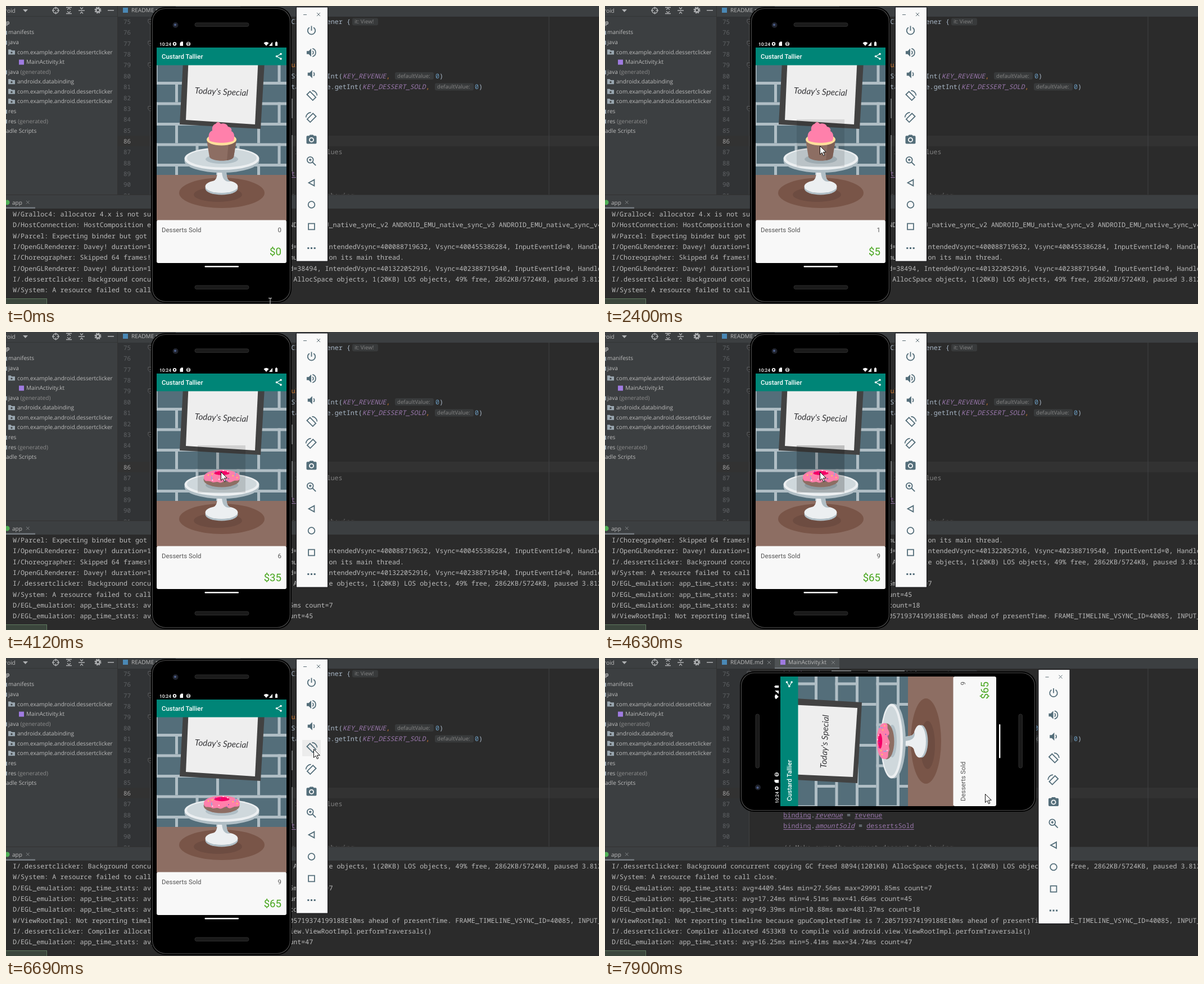
Recreate the animation shown at these times as an HTML page with a canvas. Size 1055 px wide and 531 px high, loop 8000 ms.

```html
<!DOCTYPE html>
<html lang="en">
<head>
<meta charset="utf-8">
<title>Emulator demo</title>
<style>
html, body { margin: 0; width: 100%; height: 100%; overflow: hidden; background: #2b2b2b; }
canvas { display: block; width: 1055px; height: 531px; }
</style>
</head>
<body>
<canvas id="stage" width="1055" height="531"></canvas>
<script>
const ctx = document.getElementById('stage').getContext('2d');
const LOOP = 8000, ROTATE_START = 6840, ROTATE_END = 6990;
const CHAR = 7.04;
const MONO = '"Noto Sans Mono", "DejaVu Sans Mono", monospace';
const CODE = CHAR / .6 + 'px ' + MONO;
const UI = '"Open Sans", "Noto Sans", sans-serif';
const APP = 'Roboto, sans-serif';
const PLAIN = '#a9b7c6', PURPLE = '#9876aa', ORANGE = '#cc7832', BLUE = '#6897bb', GREY = '#808080';
const ICON = '#546e7a';

// ---- timeline: each entry holds until the next one ----
const cursorKeys = [
  [0, 470, 527, 'beam'], [930, 452, 470], [1050, 431, 396], [1170, 410, 322], [1290, 395, 269],
  [1440, 382, 249], [4890, 404, 241], [5010, 460, 222], [5130, 528, 203], [5250, 579, 188, 'beam'],
  [5400, 578, 187, 'beam'], [5550, 565, 179], [5670, 557, 172], [5790, 551, 167], [5940, 549, 164],
  [6070, 547, 162], [7240, 572, 176], [7360, 607, 196], [7480, 640, 214], [7630, 662, 232],
  [7780, 671, 238], [7900, 676, 242]
];
const saleKeys = [
  [0, 0, 0], [2400, 1, 5], [2550, 2, 10], [2700, 3, 15], [2820, 4, 20],
  [4120, 6, 35], [4390, 7, 45], [4510, 8, 55], [4630, 9, 65]
];
const rippleKeys = [
  [0, 0], [2400, .1], [2550, .2], [2970, .2], [3120, .1], [3270, 0],
  [4120, .12], [4390, .2], [4890, .14], [5010, .07], [5130, 0]
];
const logKeys = [[0, 0], [2550, 1], [3510, 2], [4390, 3], [4630, 4], [5400, 6]];
const at = (keys, t) => keys.filter(k => k[0] <= t).pop();

const frameStats = (avg, min, max, count) =>
  `D/EGL_emulation: app_time_stats: avg=${avg}ms min=${min}ms max=${max}ms count=${count}`;
const slowFrame = (id, intended, vsync) =>
  `I/OpenGLRenderer: Davey! duration=1067ms; Flags=1, FrameTimelineVsyncId=${id}, ` +
  `IntendedVsync=${intended}, Vsync=${vsync}, InputEventId=0, HandleInputStart=0`;
const log = [
  'W/Gralloc4: allocator 4.x is not supported',
  'D/HostConnection: HostComposition ext ANDROID_EMU_CHECKSUM_HELPER_v1 ' +
    [2, 3, 4].map(v => 'ANDROID_EMU_native_sync_v' + v).join(' '),
  'W/Parcel: Expecting binder but got null!',
  slowFrame(38488, '400088719632', '400455386284'),
  'I/Choreographer: Skipped 64 frames!  The application may be doing too much work on its main thread.',
  slowFrame(38494, '401322052916', '402388719540'),
  'I/.dessertclicker: Background concurrent copying GC freed 8094(1201KB) AllocSpace objects, ' +
    '1(20KB) LOS objects, 49% free, 2862KB/5724KB, paused 3.812ms',
  'W/System: A resource failed to call close.',
  frameStats('4409.54', '27.56', '29991.85', 7),
  frameStats('17.24', '4.51', '41.66', 45),
  frameStats('49.39', '10.88', '481.37', 18),
  'W/ViewRootImpl: Not reporting timeline because gpuCompletedTime is 7.205719374199188E10ms ' +
    'ahead of presentTime. FRAME_TIMELINE_VSYNC_ID=40085, INPUT_ID=0',
  'I/.dessertclicker: Compiler allocated 4533KB to compile void android.view.ViewRootImpl.performTraversals()',
  frameStats('16.25', '5.41', '34.74', 47)
];

// ---- helpers ----
function rect(x, y, w, h, fill) { ctx.fillStyle = fill; ctx.fillRect(x, y, w, h); }
function paint(fill, stroke, width = 1) {
  if (fill) { ctx.fillStyle = fill; ctx.fill(); }
  if (stroke) { ctx.strokeStyle = stroke; ctx.lineWidth = width; ctx.stroke(); }
}
function round(x, y, w, h, r, fill, stroke, width) {
  ctx.beginPath(); ctx.roundRect(x, y, w, h, r); paint(fill, stroke, width);
}
function oval(x, y, rx, ry, fill, stroke, width) {
  ctx.beginPath(); ctx.ellipse(x, y, rx, ry, 0, 0, 7); paint(fill, stroke, width);
}
function path(d, fill, stroke, width = 1) {
  const p = new Path2D(d);
  if (fill) { ctx.fillStyle = fill; ctx.fill(p, 'evenodd'); }
  if (stroke) { ctx.strokeStyle = stroke; ctx.lineWidth = width; ctx.stroke(p); }
}
function text(s, x, y, font, color, align = 'left') {
  ctx.font = font; ctx.fillStyle = color; ctx.textAlign = align;
  ctx.fillText(s, x, y);
}
function clipped(x, y, w, h, draw) {
  ctx.save(); ctx.beginPath(); ctx.rect(x, y, w, h); ctx.clip(); draw(); ctx.restore();
}

// ---- IDE ----
function folder(x, y) { path(`M${x} ${y - 4.5}h4.5l1.5 1.8h6v7.2h-12z`, '#9aa7b0'); }

function projectPanel() {
  rect(0, 0, 198, 337, '#3c3f41');
  rect(0, 18, 198, 1, '#323536');
  const ui = '10.1px ' + UI;
  text('roid', -2, 11.5, ui, '#bbbbbb');
  path('M30 6h9l-4.500 5z', '#afb1b3');
  oval(88.5, 8, 5, 5, null, '#afb1b3', 1.4);
  path('M88.500 1.500v4.500M88.500 10v4.500M82 8h4.500M90.500 8h4.500', null, '#afb1b3', 1.4);
  path('M107 2.500h10M107 13.500h10M109 6.500l3-2.500 3 2.500M109 9.500l3 2.500 3-2.500', null, '#afb1b3', 1.3);
  path('M129 8h11M132 2.500l2.500 3 2.500-3M132 13.500l2.500-3 2.500 3', null, '#afb1b3', 1.3);
  ctx.setLineDash([2.4, 1.5]); oval(163.5, 7.5, 5, 5, null, '#afb1b3', 2); ctx.setLineDash([]);
  oval(163.5, 7.5, 3.2, 3.2, null, '#afb1b3', 2.4);
  rect(181, 7, 11, 1.5, '#afb1b3');
  const rows = [
    ['p', 0, 'bold'], ['manifests', 4], ['java', 4], ['com.example.android.dessertclicker', 20, 'folder'],
    ['MainActivity.kt', 36, 'kotlin'], ['java', 4, '', '(generated)'], ['androidx.databinding', 20, 'folder'],
    ['com.example.android.dessertclicker', 20, 'folder'], ['com.example.android.dessertclicker', 20, 'folder'],
    ['res', 4], ['res', 4, '', '(generated)'], ['adle Scripts', 0]
  ];
  rows.forEach(([name, x, kind, note], i) => {
    const y = 29.3 + i * 17.57;
    const font = (kind === 'bold' ? 'bold ' : '') + ui;
    text(name, x, y + 3.5, font, '#bbbbbb');
    if (note) text(note, x + ctx.measureText(name + ' ').width, y + 3.5, ui, '#8c8c8c');
    if (kind === 'folder') { folder(4, y); oval(10, y + 1, 1.6, 1.6, '#3c3f41'); }
    else if (kind === 'kotlin') rect(23, y - 4, 9, 9, '#9f7be0');
    else if (x === 4) folder(-10, y);
  });
}

function codeLine(line, col, spans) {
  const y = 32 + (line - 75) * 19.36;
  let x = 261 + col * CHAR;
  for (const [s, color, style = ''] of spans) {
    text(s, x, y, (style.includes('i') ? 'italic ' : '') + CODE, color);
    const w = s.length * CHAR;
    if (style.includes('u')) rect(x, y + 2, w, 1, color);
    x += w;
  }
}
function hint(s, x, y, w) {
  round(x, y - 6.5, w, 13, 3, '#383a3b');
  text(s, x + 4, y + 3.3, '9.6px ' + UI, '#858585');
}

function editor() {
  rect(198, 0, 857, 337, '#2b2b2b');
  rect(199, 0, 57, 337, '#313335');
  rect(199, 231, 856, 19, '#323232');
  rect(965.5, 19, 1, 318, '#414344');
  rect(256, 19, 1, 318, '#414344');
  for (let n = 75; n <= 91; n++)
    text(n, 222, 32 + (n - 75) * 19.36, '10.8px ' + MONO, n === 86 ? '#a4a3a3' : '#606366', 'right');
  for (const n of [75, 77, 79, 83]) {
    const y = 28 + (n - 75) * 19.36;
    path(`M253 ${y - 4}h7v5l-3.500 3.500-3.500-3.500zM255 ${y}h3`, '#2b2b2b', '#606366');
  }
  const state = 'savedInstanceState';
  codeLine(75, 8, [['binding', PURPLE, 'u'], ['.', PLAIN], ['dessertButton', PURPLE, 'i'], ['.setOnClickListener ', PLAIN], ['{', PLAIN]]);
  hint('it: View!', 616, 28, 46);
  codeLine(76, 12, [['onDessertClicked()', PLAIN]]);
  codeLine(77, 8, [['}', PLAIN]]);
  codeLine(79, 8, [['if ', ORANGE], [`(${state} != `, PLAIN], ['null', ORANGE], [') {', PLAIN]]);
  codeLine(80, 12, [['revenue', PURPLE, 'u'], [` = ${state}.getInt(`, PLAIN], ['KEY_REVENUE', PURPLE, 'i'], [',', ORANGE]]);
  hint('defaultValue:', 692, 124.6, 69);
  codeLine(80, (764 - 261) / CHAR, [['0', BLUE], [')', PLAIN]]);
  codeLine(81, 12, [['dessertsSold', PURPLE, 'u'], [` = ${state}.getInt(`, PLAIN], ['KEY_DESSERT_SOLD', PURPLE, 'i'], [',', ORANGE]]);
  hint('defaultValue:', 763, 144, 69);
  codeLine(81, (834 - 261) / CHAR, [['0', BLUE], [')', PLAIN]]);
  codeLine(82, 12, [['showCurrentDessert()', PLAIN]]);
  codeLine(83, 8, [['}', PLAIN]]);
  codeLine(87, 8, [['// Set the TextViews to the right values', GREY]]);
  codeLine(88, 8, [['binding', PURPLE, 'u'], ['.', PLAIN], ['revenue', PURPLE, 'iu'], [' = ', PLAIN], ['revenue', PURPLE, 'u']]);
  codeLine(89, 8, [['binding', PURPLE, 'u'], ['.', PLAIN], ['amountSold', PURPLE, 'iu'], [' = ', PLAIN], ['dessertsSold', PURPLE, 'u']]);
  codeLine(91, 8, [['// Make sure the correct dessert is showing', GREY]]);

  rect(198, 0, 857, 19, '#3c3f41');
  rect(302, 0, 115, 19, '#4e5254');
  rect(302, 17, 115, 2, '#747a80');
  rect(198, 0, 1, 337, '#323232');
  rect(208, 3, 9, 9, '#4a88b5');
  rect(312, 3, 9, 9, '#9f7be0');
  for (const [name, x, close] of [['README.md', 223, 292], ['MainActivity.kt', 326, 406]]) {
    text(name, x, 11.3, '10.1px ' + UI, '#bbbbbb');
    path(`M${close - 3} 5l6 6m0-6l-6 6`, null, '#7f8385');
  }
}

function consolePanel(first) {
  rect(0, 336, 1055, 1, '#323232');
  rect(0, 337, 1055, 24, '#3c3f41');
  rect(0, 361, 1055, 170, '#2b2b2b');
  oval(2, 350, 4.5, 4.5, '#4fae55');
  text('app', 11, 353.5, '10.1px ' + UI, '#bbbbbb');
  path('M36 347l5.500 5.500m0-5.500l-5.500 5.500', null, '#7f8385');
  rect(0, 358.5, 52, 2.5, '#747a80');
  log.slice(first, first + 8).forEach((line, i) =>
    text(line, 12, 375 + i * 19.35, CODE, '#bbbbbb'));
  rect(0, 521, 73, 10, '#5f7a5f');
  rect(0, 522, 72, 9, '#3b463c');
}

// ---- emulator ----
function wall() {
  rect(268, 105, 231, 197, '#546e7a');
  for (let row = 0; row < 6; row++) {
    const y = 98.5 + row * 36.5;
    rect(268, y, 231, 5, '#b0bec5');
    for (let x = row % 2 ? 301 : 264.5; x < 499; x += 73) rect(x, y, 5, 36.5, '#b0bec5');
  }
  path('M315 100L309 211L453 219L460 100z', '#424242');
  path('M324.500 100L320 203L443 211L448.500 100z', '#eeeeee');
  ctx.save();
  ctx.translate(383, 158); ctx.rotate(.045);
  text("Today's Special", 0, 0, 'italic 15.3px Lato, sans-serif', '#37373a', 'center');
  ctx.restore();
  rect(268, 301, 231, 81, '#8d6e63');
}

function cakeStand() {
  oval(384, 333, 76, 27, '#795548');
  oval(377, 336, 43, 13, '#6d4c41');
  oval(383.5, 325, 29, 11.5, '#b0bec5');
  oval(383.5, 321.5, 29, 11.5, '#eceff1');
  path('M376 292h16c0 14 2 18 8 21h-33c7-3 9-7 9-21z', '#eceff1');
  path('M384 292h8c0 14 2 18 8 21c-11 1-16-5-16-21z', '#b0bec5');
  oval(384, 276, 66.5, 21, '#b0bec5');
  oval(384, 272, 66.5, 20, '#eceff1');
  oval(384, 271, 62, 16.5, '#cfd8dc');
  oval(384, 273, 29, 8, '#b0bec5');
}

function cupcake() {
  path('M357 239L362 269C366 278 402 278 405 269L410 239z', '#8d6e63');
  path('M396 244L393 275C400 274 404 272 405 269L410 239z', '#7d5f55');
  oval(383.5, 238, 26.5, 10.5, '#ffdf9b');
  path('M362 240c-3-9-1-16 5-18c-1-7 2-11 6-12c3-5 7-3 9 0c6-2 11 0 13 5c5 1 7 4 6 8c6 3 6 11 4 17c-10 5-33 5-43 0z', '#ff80ab');
}

function donut() {
  oval(383.5, 263, 32, 13.5, '#8d6e63');
  path('M352 259c0-18 64-18 64 0c0 8-7 5-10 6s-8 5-12 1-10 5-15 2-9 2-13-1-14 2-14-8z', '#ff80ab');
  oval(384, 251.5, 13.5, 3.7, '#f50067');
  const colors = ['#ffeb3b', '#40c4ff', '#ffffff', '#7e57c2'];
  for (let i = 0; i < 16; i++) {
    const a = i * 2.4, r = .68 + .16 * (i % 3);
    rect(383 + Math.cos(a) * 29 * r, 255.5 + Math.sin(a) * 9.5 * r, 2, 1.5, colors[i % 4]);
  }
}

function statusBar() {
  text('10:24', 273, 70.5, '500 8.2px ' + APP, '#ffffff');
  oval(300, 67.5, 2.3, 2.3, null, '#ffffff', 1.8);
  path('M309.500 66l2-2.500h3.500v7.500h-5.500z', '#ffffff');
  oval(324.5, 67.5, 3, 3, null, '#ffffff', 1.2);
  rect(322, 67, 5, 1.2, '#ffffff');
  path('M458.500 66q4.500-4 9 0l-4.500 5zM468 71l6-7v7zM479 64.500h1v-1h2v1h1v6.500h-4z', '#ffffff');
}

function phone(sold, money, ripple) {
  round(258, 2, 250, 527, 25, '#000000');
  round(260.5, 4.5, 245, 522, 23, null, '#4c4c4c', 1.2);
  rect(508, 165, 2, 35, '#77797a');
  rect(508, 230, 2, 65, '#77797a');
  for (const y of [30, 498]) round(336, y, 96, 6.5, 3, '#1a1a1a', '#2c2c2c');
  oval(301.5, 34, 5, 5, '#20232c');
  oval(301, 33.5, 2, 2, '#4c5f8c');
  statusBar();

  clipped(268, 74, 231, 308, () => {
    wall(); cakeStand();
    if (ripple) rect(341, 202, 85, 84, `rgba(0,0,0,${ripple})`);
    (sold < 5 ? cupcake : donut)();
    rect(268, 74, 231, 31.5, '#008577');
  });
  text('Custard Tallier', 277, 94, '500 11.4px ' + APP, '#ffffff');
  path('M489 85.500l-7.500 4.300 7.500 4.300', null, '#ffffff', 1.2);
  for (const [x, y] of [[489, 85.5], [481.5, 89.8], [489, 94.1]]) oval(x, y, 1.8, 1.8, '#ffffff');

  round(268, 381.5, 231, 76.5, 3, '#f8f8f8');
  text('Desserts Sold', 277, 402.5, '11.4px ' + APP, '#555555');
  text(sold, 490, 402.5, '11.4px ' + APP, '#555555', 'right');
  text('$' + money, 490, 443.5, '18.6px ' + APP, '#46a51c', 'right');
  round(353.5, 463, 60.5, 2.4, 1, '#ffffff');
}

const buttons = [
  [44, '', 'M8 5.500a7.500 7.500 0 1 0 8 0M12 2.500v9.500'],
  [83, 'M2.500 9v6h4l5 5V4l-5 5z', 'M14 8.500a4.500 4.500 0 0 1 0 7M14 4.200a8 8 0 0 1 0 15.600'],
  [121.5, 'M4.500 9v6h4l5 5V4l-5 5z', 'M16 8.500a4.500 4.500 0 0 1 0 7'],
  [160, '', 'M9 3.500L3 9.500l11.500 11.500 6-6zM13 1.500a10.500 10.500 0 0 1 10 10'],
  [199, '', 'M15 3.500l6 6L9.500 21l-6-6zM11 1.500a10.500 10.500 0 0 0-10 10'],
  [237.5, 'M9 3L7.200 5H4a2 2 0 0 0-2 2v12a2 2 0 0 0 2 2h16a2 2 0 0 0 2-2V7a2 2 0 0 0-2-2h-3.200L15 3zM12 8a5 5 0 1 0 0 10a5 5 0 0 0 0-10zM12 10a3 3 0 1 1 0 6a3 3 0 0 1 0-6z', ''],
  [276, '', 'M3.500 10a6 6 0 1 0 12 0a6 6 0 1 0-12 0zM14 14.500l6.500 6.500M7 10h5M9.500 7.500v5'],
  [315, '', 'M17.500 6v12L6.500 12z'],
  [354, '', 'M5.500 12a6.500 6.500 0 1 0 13 0a6.500 6.500 0 1 0-13 0z'],
  [393, '', 'M6 6h12v12h-12z'],
  [431.5, 'M4 10.300h3.400v3.400H4zM10.300 10.300h3.400v3.400h-3.400zM16.600 10.300h3.400v3.400h-3.400z', '']
];

function toolbar(hover) {
  rect(516, 1.5, 57, 454, '#16161a');
  rect(517, 2.5, 55, 452, '#f9f9f9');
  if (hover) rect(527, 146, 33, 29, '#ececec');
  rect(529, 15, 6, 1, '#5c6d75');
  path('M553 12l6 6m0-6l-6 6', null, '#5c6d75');
  for (const [y, fill, line] of buttons) {
    ctx.save();
    ctx.translate(543.5, y); ctx.scale(.9, .9); ctx.translate(-12, -12);
    if (fill) path(fill, ICON);
    if (line) path(line, null, ICON, 2);
    ctx.restore();
  }
}

function cursor([, x, y, kind]) {
  if (kind === 'beam') {
    path(`M${x - 3} ${y - 6.5}h2.500l.5 1 .5-1h2.500M${x} ${y - 6}v12M${x - 3} ${y + 6.5}h2.500l.5-1 .5 1h2.500`, null, '#dddddd');
  } else {
    path(`M${x + .5} ${y + .5}v15l3.500-3.300 2.500 5.600 2.300-1-2.400-5.500h4.900z`, '#ffffff', '#111111');
  }
}

function draw(t) {
  ctx.setTransform(1, 0, 0, 1, 0, 0);
  ctx.textRendering = 'geometricPrecision';
  editor();
  projectPanel();
  consolePanel(at(logKeys, t)[1]);

  const turned = t >= ROTATE_START;
  if (!turned || t >= ROTATE_END) {
    const [, sold, money] = at(saleKeys, t);
    ctx.save();
    if (turned) ctx.transform(0, -1, 1, 0, 238, 532);
    phone(sold, money, at(rippleKeys, t)[1]);
    ctx.restore();
  }
  ctx.save();
  if (turned) ctx.translate(254.5, 18.5);
  if (turned && t < ROTATE_END) ctx.globalAlpha = .5;
  toolbar(t >= 6570 && !turned);
  ctx.restore();
  cursor(at(cursorKeys, t));
}

function tick() {
  draw(performance.now() % LOOP);
  requestAnimationFrame(tick);
}
tick();
</script>
</body>
</html>
```
